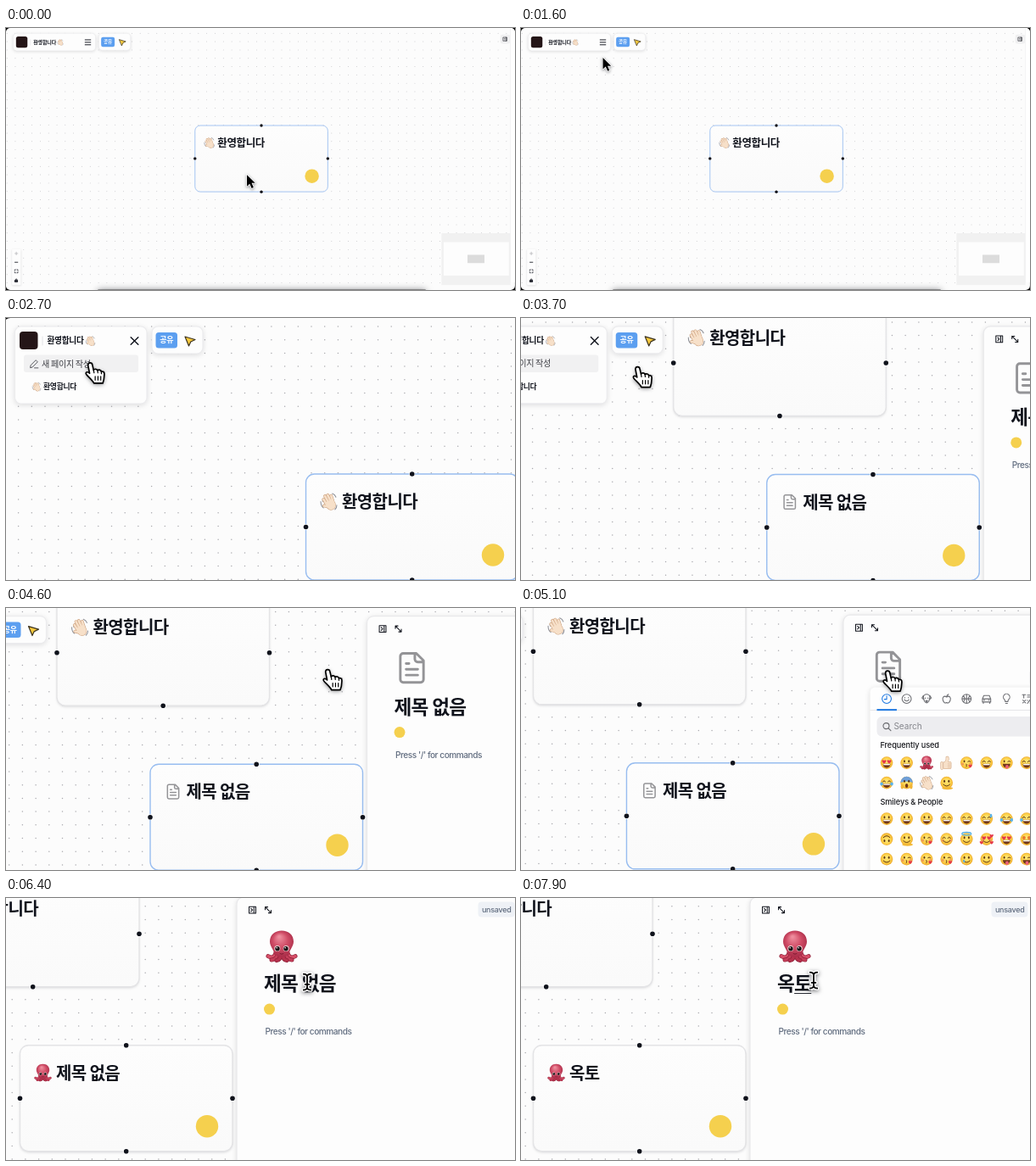
An HTML page with a canvas for the animation above (8000 ms loop, 600x309 px).

```html
<!DOCTYPE html>
<html lang="ko">
<head>
<meta charset="utf-8">
<title>페이지 만들기</title>
<style>
html, body { margin: 0; width: 100%; height: 100%; overflow: hidden; background: #000; }
canvas { display: block; width: 100vw; height: 100vh; }
</style>
</head>
<body>
<canvas id="stage"></canvas>
<script>
const W = 600, H = 309, LOOP = 8000, STEP = 100;
const ZOOM = 1.6, DOT_GAP = 15.7;
const canvas = document.getElementById('stage');
const ctx = canvas.getContext('2d');
const dpr = window.devicePixelRatio || 1;
canvas.width = W * dpr;
canvas.height = H * dpr;

const KR = '"Noto Sans CJK KR", "Noto Sans CJK", sans-serif';
const EN = 'Inter, sans-serif';
const INK = '#10131c', YELLOW = '#f5d04e', BLUE = '#98bdf0';
let view = 1;

// Motion tracks: [time, value...], joined by a monotone cubic
const cameraTrack = [[0, 0.9, 0], [1650, 0.9, 0], [2600, -1.5, 0], [2900, -1.5, 0], [4600, -186, -0.4],
  [5600, -274, -4.4], [6400, -339.5, -10.9], [7500, -341.5, -10.9], [8000, -341.5, -10.9]];
const zoomTrack = [[0, 1 / ZOOM], [1650, 1 / ZOOM], [2550, 1], [8000, 1]];
const panTrack = [[0, 0, 0], [3000, 0, 0], [3400, -109, -193.4], [8000, -109, -193.4]];
const cursorTrack = [[0, 453, 277], [850, 453, 277], [1500, 153, 56], [1600, 153, 56], [1800, 152, 29],
  [2000, 152, 29], [2500, 101, 53], [3200, 101, 53], [4600, 565.5, 73], [5000, 664, 76], [5200, 664, 76],
  [5600, 698, 133], [5850, 710, 184], [6000, 710, 184], [6400, 694.5, 110], [7000, 686.5, 108], [8000, 686.5, 108]];
const pointers = [[0, 'arrow'], [1800, 'hand'], [5200, 'arrow'], [5750, 'hand'], [6100, 'arrow'], [6300, 'beam']];
const titles = [[0, '제목 없음'], [7400, 'ㅇ'], [7500, '오'], [7700, '옥'], [7800, '옥ㅌ'], [7900, '옥토']];

function track(keys, t) {
  let i = 0;
  while (i < keys.length - 2 && t >= keys[i + 1][0]) i++;
  const a = keys[i], b = keys[i + 1], d = b[0] - a[0], u = Math.min(1, (t - a[0]) / d);
  const slope = (n, c) => keys[n] && keys[n + 1] ? (keys[n + 1][c] - keys[n][c]) / (keys[n + 1][0] - keys[n][0]) : 0;
  const tangent = (n, c) => {
    const p = slope(n - 1, c), q = slope(n, c);
    return p * q > 0 ? 2 * p * q / (p + q) : 0;
  };
  return a.slice(1).map((v, j) => {
    const c = j + 1, u2 = u * u, u3 = u2 * u;
    return (2 * u3 - 3 * u2 + 1) * v + (3 * u2 - 2 * u3) * b[c]
      + d * ((u3 - 2 * u2 + u) * tangent(i, c) + (u3 - u2) * tangent(i + 1, c));
  });
}
const latest = (list, t) => list.filter(e => e[0] <= t).pop()[1];

// Drawing helpers
function at(x, y, scale, draw) {
  ctx.save();
  ctx.translate(x, y);
  ctx.scale(scale, scale);
  draw();
  ctx.restore();
}
function shadow(blur, alpha) {
  ctx.shadowColor = `rgba(20,22,30,${alpha})`;
  ctx.shadowBlur = blur * view * dpr;
  ctx.shadowOffsetY = 1.5 * view * dpr;
}
function box(x, y, w, h, r, fill, stroke, blur, lw = 1.2) {
  ctx.save();
  if (blur) shadow(blur, 0.15);
  ctx.beginPath();
  ctx.roundRect(x, y, w, h, r);
  ctx.fillStyle = fill;
  ctx.fill();
  ctx.restore();
  if (stroke) {
    ctx.strokeStyle = stroke;
    ctx.lineWidth = lw;
    ctx.stroke();
  }
}
function oval(x, y, rx, ry, fill) {
  ctx.beginPath();
  ctx.ellipse(x, y, rx, ry, 0, 0, 7);
  ctx.fillStyle = fill;
  ctx.fill();
}
const disc = (x, y, r, fill) => oval(x, y, r, r, fill);
function line(d, color, lw) {
  ctx.strokeStyle = color;
  ctx.lineWidth = lw;
  ctx.lineCap = ctx.lineJoin = 'round';
  ctx.stroke(new Path2D(d));
}
function shape(d, fill) {
  ctx.fillStyle = fill;
  ctx.fill(new Path2D(d));
}
function text(s, x, y, size, weight, color, family = KR, spacing = -0.03, align = 'left') {
  ctx.font = `${weight} ${size}px ${family}`;
  ctx.letterSpacing = size * spacing + 'px';
  ctx.textAlign = align;
  ctx.textBaseline = 'alphabetic';
  ctx.fillStyle = color;
  ctx.fillText(s, x, y + size * 0.355);
  return ctx.measureText(s).width;
}

// Icons on a 24-unit grid
const ICON = {
  doc: 'M15 2H6a2 2 0 0 0-2 2v16a2 2 0 0 0 2 2h12a2 2 0 0 0 2-2V7ZM14 2v4a2 2 0 0 0 2 2h4M10 9H8M16 13H8M16 17H8',
  panel: 'M3 3h18v18H3zM16 3v18M8 8l4 4-4 4',
  expand: 'M4 11V4h7M20 13v7h-7M4 4l16 16',
  pencil: 'M4 20l1-5L16 4l4 4L9 19zM13 21h8',
  search: 'M17 10a7 7 0 1 1-14 0 7 7 0 0 1 14 0M15 15l6 6',
  close: 'M4 4l16 16M20 4L4 20',
  menu: 'M3 4h18M3 12h18M3 20h18',
  plus: 'M12 4v16M4 12h16',
  minus: 'M4 12h16',
  fit: 'M3 8V3h5M16 3h5v5M21 16v5h-5M8 21H3v-5',
  lock: 'M5 11h14v9H5zM8 11V7a4 4 0 0 1 8 0v4M5 14h14M5 17h14'
};
const RING = 'M22 12a10 10 0 1 1-20 0 10 10 0 0 1 20 0';
const CATEGORIES = [
  RING + 'M12 6v7h-5',
  RING + 'M8 9v1M16 9v1M7 14q5 6 10 0',
  'M5 9a7 7 0 0 1 14 0l-2 8q-5 8-10 0zM5 5L2 10l3 3M19 5l3 5-3 3M9 10v1M15 10v1M10 16h4l-2 3z',
  'M12 8C6 4 2 9 4 15s5 7 8 5c3 2 6 1 8-5s-2-11-8-7M12 8q0-4 4-6',
  RING + 'M2 12h20M12 2v20M5 5q6 7 0 14M19 5q-6 7 0 14',
  'M3 19v-7l3-7h12l3 7v7zM3 12h18M6 15h2M16 15h2M5 19v3M19 19v3',
  'M9 18q0-3-2-5a7 7 0 1 1 10 0q-2 2-2 5zM10 22h4',
  'M3 3h7M6 3v7M14 4h7M14 8h7M4 15l6 6M10 15l-6 6M20 14l-6 8M14 15v1M20 21v1',
  'M5 22L3 3q5-2 9 1t9 0l-3 11q-5 2-8 0t-6 0'
];
const icon = (d, x, y, size, color, lw = 2) =>
  at(x, y, size / 24, () => { ctx.translate(-12, -12); line(d, color, lw); });

// Emoji
const SKIN = '#f7e0c9', SKIN_EDGE = '#cfa583';
function wave(x, y, size) {
  at(x, y, size / 20, () => {
    line('M-9 0q0 5 3 7M-7-2q0 1 .5 2M4-9q3 1 4 4M9 4q0 3-2 5', '#8d8f96', 1);
    ctx.rotate(-0.5);
    const fingers = 'M-3.5 1L-4-5M-.8 0L-.8-7.5M2-.2L2.4-7M4.3 1.5L5.4-4.5M-3 5L-7 1.5';
    const palm = 'M-4 0h8.5v5q-1 4-4.5 4t-4-4z';
    line(palm, SKIN_EDGE, 2.6);
    line(fingers, SKIN_EDGE, 3.6);
    line(palm, SKIN, 1.6);
    shape(palm, SKIN);
    line(fingers, SKIN, 2.4);
  });
}
function thumb(x, y, size) {
  at(x, y, size / 20, () => {
    const up = 'M-1 0Q2-4 1-7.5', fist = 'M-3 0h8v7h-8z', cuff = 'M-7 0v8';
    for (const [c, grow] of [[SKIN_EDGE, 1.2], [SKIN, 0]]) {
      line(up, c, 3.6 + grow);
      line(fist, c, 3 + grow);
      line(cuff, c, 3 + grow);
      shape(fist, c);
    }
    line('M2 1.5h4M2 4h4M2 6.5h4', SKIN_EDGE, 0.6);
  });
}
function octopus(x, y, size) {
  at(x, y, size / 40, () => {
    const legs = ['M-7 7Q-9 15-16 11M7 7Q9 15 16 11', 'M-5 8Q-5 15-12 15.5M5 8Q5 15 12 15.5', 'M-2 9Q-1 15-6 16M2 9Q1 15 6 16'];
    legs.forEach((d, i) => {
      line(d, '#8f2038', 5);
      line(d, ['#d75069', '#c43f5a', '#b5324d'][i], 3.6);
    });
    const skin = ctx.createRadialGradient(-3, -12, 1, 0, -4, 17);
    skin.addColorStop(0, '#ee8d9d');
    skin.addColorStop(0.5, '#d04c66');
    skin.addColorStop(1, '#a52a46');
    shape('M-9 9C-8 5-14 0-14-6C-14-14-8-19 0-19S14-14 14-6C14 0 8 5 9 9Q0 15-9 9Z', skin);
    for (const s of [-1, 1]) {
      disc(s * 5.2, 2, 3.5, '#f2d3d6');
      disc(s * 5, 2.2, 2.7, '#1b1115');
      disc(s * 5 - 0.8, 1.2, 0.8, '#fff');
    }
    line('M-2 8Q0 9.5 2 8', '#7c1a30', 1);
  });
}
function heart(x, y, s) {
  at(x, y, s, () => shape('M0 2.4C-4-.5-2-3 0-1C2-3 4-.5 0 2.4Z', '#e5364a'));
}
function face(kind, x, y) {
  at(x, y, 1, () => {
    const has = set => set.includes(kind), dark = '#5b3515';
    if (kind === 'u') ctx.rotate(Math.PI);
    const skin = ctx.createRadialGradient(0, -2, 1, 0, 0, 7.5);
    skin.addColorStop(0, '#ffe572');
    skin.addColorStop(0.7, '#fbcb43');
    skin.addColorStop(1, '#eba52b');
    disc(0, 0, 7.3, skin);
    if (has('x')) shape('M-7.3 0A7.3 7.3 0 0 1 7.3 0Q0-3-7.3 0Z', '#6f9fd8');
    if (has('blk')) for (const s of [-1, 1]) disc(s * 4.7, 1.5, 1.6, '#f19a55');
    if (has('hl')) { heart(-3, -1.6, 1.05); heart(3, -1.6, 1.05); }
    else if (has('*')) { disc(-3, -1.6, 1.9, '#e7772e'); disc(3, -1.6, 1.9, '#e7772e'); }
    else if (has('qjrbs')) line('M-4.5-1Q-3-4-1.5-1M1.5-1Q3-4 4.5-1', dark, 1);
    else if (has('kw')) { oval(-2.7, -1.8, 0.9, 1.4, dark); line('M1.5-1.5Q3-3 4.5-1.5', dark, 1); }
    else for (const s of [-1, 1]) oval(s * 2.6, -1.8, 0.95, 1.5, dark);
    if (has('gqjrshw*')) {
      shape('M-4.5 1.2H4.5Q4 5.8 0 5.8T-4.5 1.2Z', '#70371a');
      if (kind === 'w') oval(0.6, 4.7, 1.9, 2.2, '#ec6078');
      else ctx.fillStyle = '#fff', ctx.fillRect(-3.8, 1.3, 7.6, 1.4);
    } else if (kind === 'k') {
      line('M-.5 1.5q2 .5 0 1.5q2 .5 0 1.5', dark, 0.9);
      heart(4.3, 3.6, 0.9);
    } else if (kind === 'x') {
      oval(0, 3.4, 1.7, 2.5, '#70371a');
      for (const s of [-1, 1]) oval(s * 5.3, 4.5, 1.7, 2.8, '#f0b538');
    } else line('M-3.8 2Q0 6 3.8 2', dark, 1);
    if (kind === 's') oval(5.2, -3.6, 1.4, 2.2, '#59b4ec');
    if (has('jr')) for (const s of [-1, 1]) oval(s * 6, 1.5, 1.7, 2, '#59b4ec');
    if (kind === 'y') oval(-3, 2.5, 1, 1.8, '#59b4ec');
    if (kind === 'l') { heart(6, -4, 0.9); heart(-6, 4, 0.9); heart(6, 4, 0.9); }
    if (kind === 'a') {
      ctx.beginPath();
      ctx.ellipse(0, -6.3, 5.5, 1.8, 0, 0, 7);
      ctx.strokeStyle = '#58b2e8';
      ctx.lineWidth = 1.3;
      ctx.stroke();
    }
    if (kind === 'm') oval(1, 6.5, 6.5, 1.6, '#f2b836');
  });
}
function emoji(kind, x, y) {
  if (kind === 'o') octopus(x, y, 17);
  else if (kind === 't') thumb(x, y, 16);
  else if (kind === 'v') wave(x, y, 17);
  else face(kind, x, y);
}

// Scene parts
function dots(px, py) {
  ctx.fillStyle = '#aaaaaf';
  const wrap = v => ((v % DOT_GAP) + DOT_GAP) % DOT_GAP;
  for (let y = wrap(py + 10); y < 494; y += DOT_GAP)
    for (let x = wrap(px + 0.4); x < 948; x += DOT_GAP) {
      ctx.beginPath();
      ctx.arc(x, y, 0.75, 0, 7);
      ctx.fill();
    }
}
function card(x, y, selected, badge, mark, title) {
  at(x, y, 1, () => {
    const fill = ctx.createLinearGradient(0, 0, 0, 125);
    fill.addColorStop(0, '#fdfdfd');
    fill.addColorStop(1, '#fafafa');
    box(0, 0, 250.5, 125, 10, fill, selected ? BLUE : '#e4e4e6', selected ? 0 : 3, 1.4);
    mark(27, 32.5);
    text(title, 42.5, 33, 20, 700, INK);
    if (badge) disc(220.5, 95.5, 13.2, YELLOW);
    for (const [hx, hy] of [[125.2, 0], [0, 62.5], [250.5, 62.5], [125.2, 125]]) {
      disc(hx, hy, 3.4, '#fff');
      disc(hx, hy, 2.8, INK);
    }
  });
}
function toolbar(open) {
  box(12, 10, 155.5, open ? 91 : 33, 7, '#fdfdfd', '#ececee', 6);
  box(17.5, 16, 21.5, 21, 4, '#241517');
  line('M44.5 22v10', '#e3e3e5', 1);
  text('환영합니다', 50, 27, 9.7, 700, INK);
  wave(101, 27, 12);
  icon(open ? ICON.close : ICON.menu, 153, 27, open ? 13 : 14, INK, 2.6);
  if (open) {
    box(22.5, 43.5, 135, 20.5, 3, '#f1f1f2');
    icon(ICON.pencil, 34.5, 54, 13, '#55565c', 1.8);
    text('새 페이지 작성', 43.5, 54, 10.1, 400, '#3c3d43');
    wave(37.5, 81, 11);
    text('환영합니다', 45.5, 81, 8.8, 700, INK);
  }
  box(173.5, 10, 60, 32, 7, '#fdfdfd', '#ececee', 6);
  box(178, 17, 25.5, 18.5, 3.5, '#5c9ff0');
  text('공유', 190.7, 26.2, 9, 700, '#fff', KR, -0.03, 'center');
  at(218.5, 27, 1, () => {
    const d = 'M-6-5L6-1.5L.8 1L-1.5 6Z';
    shape(d, '#f8c93c');
    line(d, '#3d3420', 1.2);
  });
}
function chrome() {
  box(820, 387, 130, 98, 0, '#f1f1f1');
  box(824, 404, 123, 63, 0, '#fdfdfd');
  box(869, 428, 32, 15.5, 0, '#dcdcdc');
  box(10, 417, 16.5, 68, 2, '#fdfdfd', null, 4);
  icon(ICON.plus, 18, 425.5, 8, '#a9a9ad', 3);
  icon(ICON.minus, 18, 442, 8, INK, 4);
  icon(ICON.fit, 18, 459, 8, INK, 3.5);
  icon(ICON.lock, 18, 476.5, 8, INK, 4);
  box(931, 12.5, 18, 17, 3, '#f0f0f1');
  icon(ICON.panel, 940, 21, 9, INK, 2.4);
  box(950, 0, 10, 480, 0, '#fff');
  line('M950 2V480', '#ececee', 1);
}
function panel(chosen, title, typing) {
  box(611.5, 10, 338, 475, 8, '#fdfdfd', '#e9e9eb', 6);
  icon(ICON.panel, 630, 25, 10.5, INK, 2.4);
  icon(ICON.expand, 648.5, 25, 10.5, INK, 2.4);
  if (chosen) octopus(664.5, 68.5, 40);
  else icon(ICON.doc, 664.5, 71, 41, '#949497', 1.7);
  const lift = chosen ? 5 : 0;
  const width = text(title, 643.5, 117 - lift, 22.6, 700, INK);
  if (typing) {
    const last = text(title.slice(-1), -999, 0, 22.6, 700, INK);
    box(643.5 + width - last, 123, last, 0.9, 0, INK);
  }
  disc(650, 147 - lift, 6.5, YELLOW);
  text("Press '/' for commands", 645, 173.5 - lift, 10.1, 500, '#5f6b7e', EN, -0.045);
  if (chosen) {
    box(896, 15.5, 43, 18, 4, '#eef1f6');
    text('unsaved', 917.7, 24.4, 9, 500, '#5f6b7e', EN, -0.03, 'center');
  }
}
function picker() {
  at(274, 4.4, 1, () => {
    box(557, 71, 42, 17, 3, '#f1f1f3');
    text('Remove', 578, 79.5, 8.8, 600, '#17181d', EN, -0.02, 'center');
    box(369, 91, 232, 270, 6, '#fefefe', null, 6);
    const col = i => 388.6 + i * 23.55;
    CATEGORIES.forEach((d, i) => icon(d, col(i), 104.5, 13, i ? '#6c6d72' : '#1f78e0', 2));
    box(369, 117.5, 232, 0.8, 0, '#e6e6e8');
    box(377, 116.5, 23.5, 2, 0, '#1f78e0');
    box(377, 125.5, 191, 23.5, 6, '#ededf0');
    icon(ICON.search, 389, 137.5, 12, '#66676c', 2.2);
    text('Search', 397, 137.3, 10, 400, '#85868c', EN, 0);
    disc(579.5, 137.5, 5.5, '#f3d9bd');
    text('Frequently used', 381, 159, 9.2, 500, '#17181d', EN, -0.01);
    text('Smileys & People', 381, 226, 9.2, 500, '#17181d', EN, -0.01);
    const rows = [[180, 'hgotkqwsa'], [203.5, 'jxvm'], [246, 'gggqqsrjc'], [270, 'umkbalh*k'], [293.5, 'ckkkycwww'], [317, 'cccckcccc']];
    for (const [y, kinds] of rows) [...kinds].forEach((kind, i) => emoji(kind, col(i), y));
    box(592, 152, 4.5, 36, 2, '#dcdcdf');
  });
}
function pointer(kind, x, y) {
  at(x, y, 0.94, () => {
    shadow(5, 0.55);
    if (kind === 'arrow') {
      const d = 'M0 0V23L5.5 18L9.5 27L13.3 25.4L9.4 16.5H16.5Z';
      line(d, '#fff', 2.6);
      ctx.shadowColor = 'transparent';
      shape(d, '#000');
    } else if (kind === 'hand') {
      const d = 'M-3 3C-3-1 2-1 2.5 2.5L4 9C5 7 8.5 7.5 9 9.5C10.5 8 13.5 9 13.7 11C16 10 17.5 11.5 17.5 14L17 19C17 22 16 23 15.5 25.5H4.5C3 22-2 18-5 14.5C-7 12-4 10-1 13Z';
      shape(d, '#fff');
      ctx.shadowColor = 'transparent';
      line(d, '#000', 1.8);
      line('M4 9L4.6 12.5M9 9.5L9.3 12.5M13.7 11L13.8 13.5M6 17v4.5M9.5 17v4.5M13 17v4.5', '#000', 1.3);
    } else {
      const d = 'M-4.5-10Q0-10 0-6V6Q0 10-4.5 10M4.5-10Q0-10 0-6M4.5 10Q0 10 0 6M-2.5 3H2.5';
      line(d, '#fff', 5);
      ctx.shadowColor = 'transparent';
      line(d, '#000', 1.9);
    }
  });
}
function dockShadow() {
  ctx.save();
  shadow(14, 0.6);
  ctx.fillStyle = '#555';
  ctx.fillRect(172, 493.5, 618, 14);
  ctx.restore();
}

function draw(t) {
  const [camX, camY] = track(cameraTrack, t);
  const [panX, panY] = track(panTrack, t);
  const [curX, curY] = track(cursorTrack, t);
  [view] = track(zoomTrack, t);
  const created = t >= 3000, chosen = t >= 6000;
  const title = latest(titles, t);

  ctx.setTransform(dpr, 0, 0, dpr, 0, 0);
  ctx.fillStyle = '#000';
  ctx.fillRect(0, 0, W, H);
  ctx.save();
  ctx.translate(camX, camY);
  ctx.scale(view, view);
  ctx.beginPath();
  ctx.roundRect(-1.5, 0, 960, 494.4, 8);
  ctx.clip();
  ctx.fillStyle = '#fcfcfc';
  ctx.fillRect(-2, 0, 962, 495);

  dots(panX, panY);
  card(355 + panX, 184 + panY, !created, !created, (x, y) => wave(x, y, 21), '환영합니다');
  if (created) {
    const mark = chosen ? (x, y) => octopus(x, y, 22) : (x, y) => icon(ICON.doc, x, y, 20, '#949497', 1.8);
    card(465 + panX, 378 + panY, !chosen, true, mark, title);
  }
  chrome();
  if (created) panel(chosen, title, t >= 7400);
  if (t >= 5100 && !chosen) picker();
  toolbar(t >= 1900);
  dockShadow();
  pointer(latest(pointers, t), curX, curY);
  ctx.restore();
}

let start;
function tick(now) {
  start ??= now;
  const t = (now - start) % LOOP;
  draw(Math.floor(t / STEP) * STEP);
  requestAnimationFrame(tick);
}
requestAnimationFrame(tick);
</script>
</body>
</html>
```
